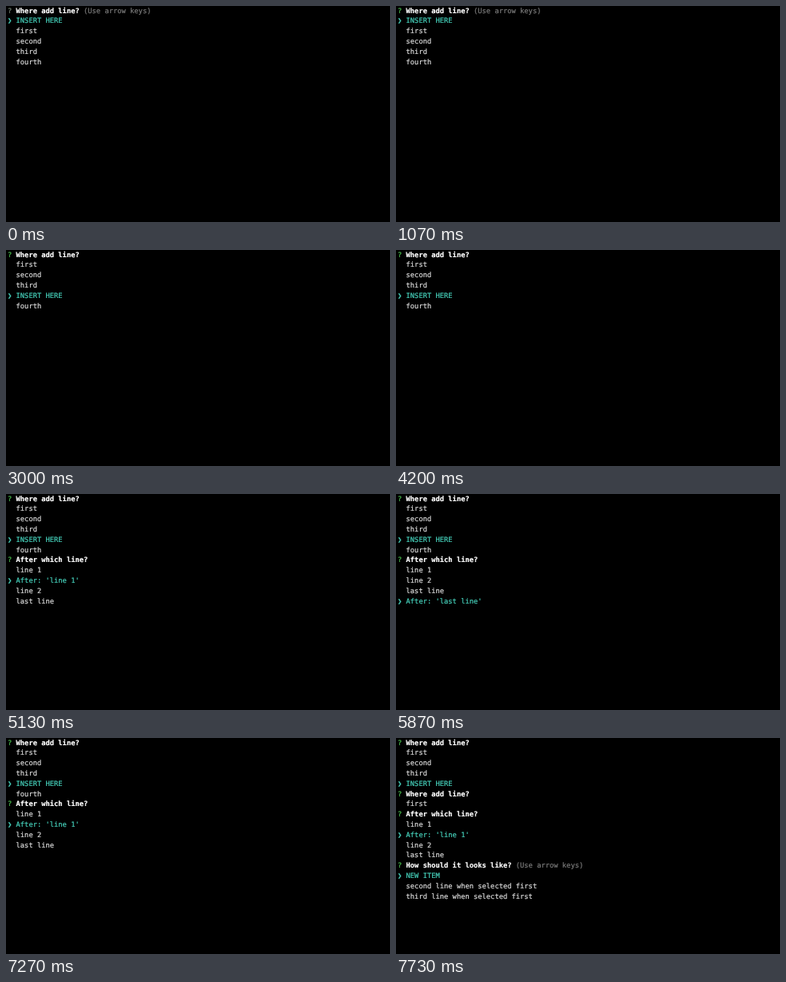
Animation, 480 px wide and 270 px high, one loop 8000 ms. Source, as an HTML page:

```html
<!DOCTYPE html>
<html lang="en">
<head>
<meta charset="utf-8">
<title>Select line prompt</title>
<style>
  html, body { margin: 0; width: 100%; height: 100%; overflow: hidden; background: #000; }
  #terminal {
    position: absolute; left: 2px; top: .65px; margin: 0;
    font: 8.77px/12.8px "DejaVu Sans Mono", monospace;
    text-rendering: geometricPrecision;
    -webkit-text-stroke: .2px;
    color: #dcdcdc;
  }
  b { color: #fff; }
  .mark { color: var(--mark); }
  .hint { color: #7c7c7c; }
  .active { color: #46d2bc; }
</style>
</head>
<body>
<pre id="terminal"></pre>
<script>
const LOOP = 8000;
const terminal = document.getElementById('terminal');

const span = (cls, text) => `<span class="${cls}">${text}</span>`;
const prompt = (text, hint) =>
  `${span('mark', '?')} <b>${text}</b>${hint ? span('hint', ' (Use arrow keys)') : ''}`;
const active = text => span('active', '❯ ' + text);

// A list of choices with the placeholder inserted at the given position.
function select(question, choices, placeholder, position, hint) {
  const rows = choices.map(choice => '  ' + choice);
  rows.splice(position, 0, active(placeholder));
  return [prompt(question, hint), ...rows];
}

const where = (position, hint) =>
  select('Where add line?', ['first', 'second', 'third', 'fourth'], 'INSERT HERE', position, hint);

const lines = ['line 1', 'line 2', 'last line'];
const after = (position, hint) =>
  select('After which line?', lines,
    position ? `After: '${lines[position - 1]}'` : `Before: '${lines[0]}'`, position, hint);

const look = () =>
  select('How should it looks like?',
    ['second line when selected first', 'third line when selected first'], 'NEW ITEM', 0, true);

const both = (position, hint) => [...where(3), ...after(position, hint)];

const screens = [
  [0, where(0, true)],
  [1800, where(1)],
  [2130, where(2)],
  [2400, where(3)],
  [4530, both(0, true)],
  [5130, both(1)],
  [5470, both(2)],
  [5870, both(3)],
  [6470, both(2)],
  [7270, both(1)],
  [7730, [...where(3).slice(0, 5), ...where(3).slice(0, 2), ...after(1), ...look()]]
].map(([start, rows]) => ({ start, html: rows.join('\n') }));

let shown;
function draw(now) {
  const t = now % LOOP;
  const screen = screens.findLast(s => s.start <= t);
  if (screen !== shown) terminal.innerHTML = screen.html;
  shown = screen;

  // The first question mark turns from grey to green in small steps.
  const tint = Math.min(4, Math.ceil(Math.max(0, t - 69) / 67)) / 4;
  const mix = (from, to) => Math.round(from + (to - from) * tint);
  terminal.style.setProperty('--mark', `rgb(${mix(115, 75)} ${mix(130, 195)} ${mix(115, 80)})`);
  requestAnimationFrame(() => draw(performance.now()));
}
draw(performance.now());
</script>
</body>
</html>
```
